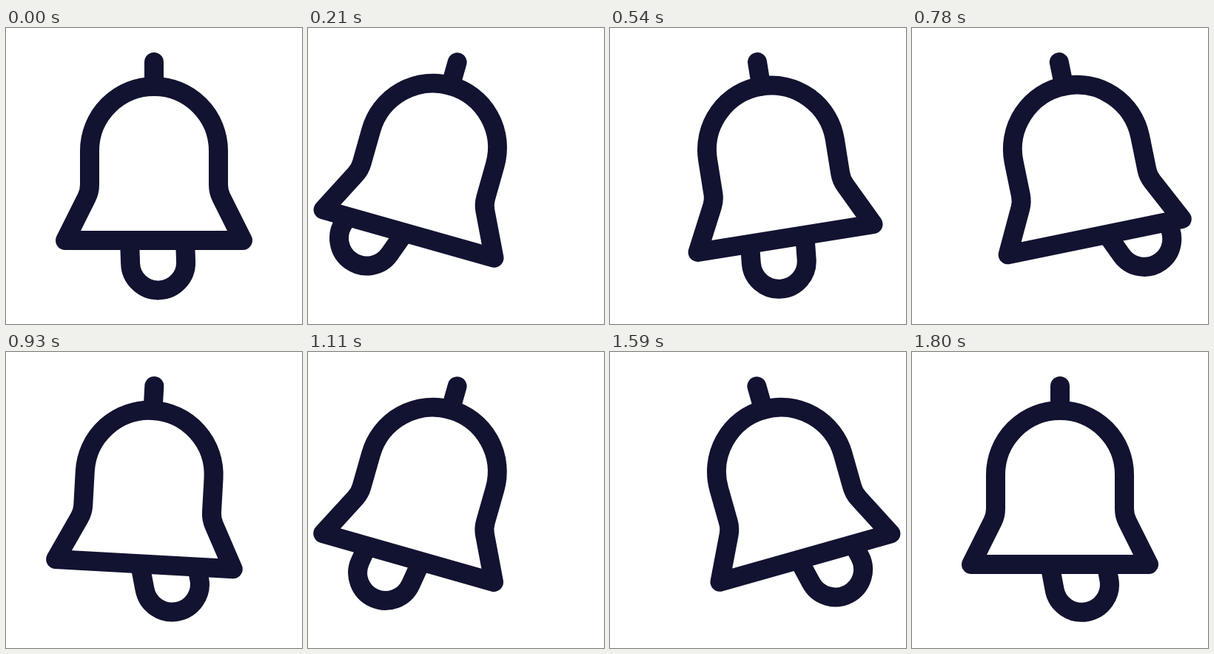
An HTML page for the animation above (1.83 s loop, 400 by 400 pixels).

```html
<!DOCTYPE html>
<html lang="en">
<head>
<meta charset="utf-8">
<title>Ringing bell</title>
<style>
  html, body { margin: 0; width: 100%; height: 100%; overflow: hidden; background: #fff; }
  svg { display: block; width: 100vw; height: 100vh; }
</style>
</head>
<body>
<svg viewBox="0 0 400 400" fill="none" stroke="#121331" stroke-width="26" stroke-linejoin="round">
  <clipPath id="below"><rect x="-200" y="287" width="800" height="300"/></clipPath>
  <g id="bell">
    <g clip-path="url(#below)">
      <path id="clapper" d="M162.5 255V317a37.5 37.5 0 0 0 75 0V255"/>
    </g>
    <path d="M200 46V79" stroke-linecap="round"/>
    <path d="M80 287L109 229Q113 221 113 212V166A87 87 0 0 1 287 166V212Q287 221 291 229L320 287Z"/>
  </g>
</svg>
<script>
  const STEP = 30, LOOP = 1830;
  const bell = document.getElementById("bell");
  const clapper = document.getElementById("clapper");

  // [time in steps, angle in degrees]; every swing eases in and out
  const bellSwing = [[0, 0], [7.5, 16], [22.5, -16], [37.5, 16], [52.5, -16], [60, 0]];
  const clapperSwing = [[0, -2], [11, 28.4], [26, -23.8], [42.25, 19.3], [56, -17], [65.6, 0]];

  function angleAt(keys, time) {
    const next = keys.findIndex(([t]) => t > time);
    if (next < 0) return keys[keys.length - 1][1];
    const [t0, a0] = keys[next - 1], [t1, a1] = keys[next];
    const p = (time - t0) / (t1 - t0);
    return a0 + (a1 - a0) * p * p * (3 - 2 * p);
  }

  function render(ms) {
    const time = Math.floor((ms % LOOP) / STEP);
    bell.setAttribute("transform", `rotate(${angleAt(bellSwing, time)} 200 52)`);
    clapper.setAttribute("transform", `rotate(${angleAt(clapperSwing, time)} 200 157)`);
  }

  let start;
  function tick(now) {
    start ??= now;
    render(now - start);
    requestAnimationFrame(tick);
  }
  render(0);
  requestAnimationFrame(tick);
</script>
</body>
</html>
```
